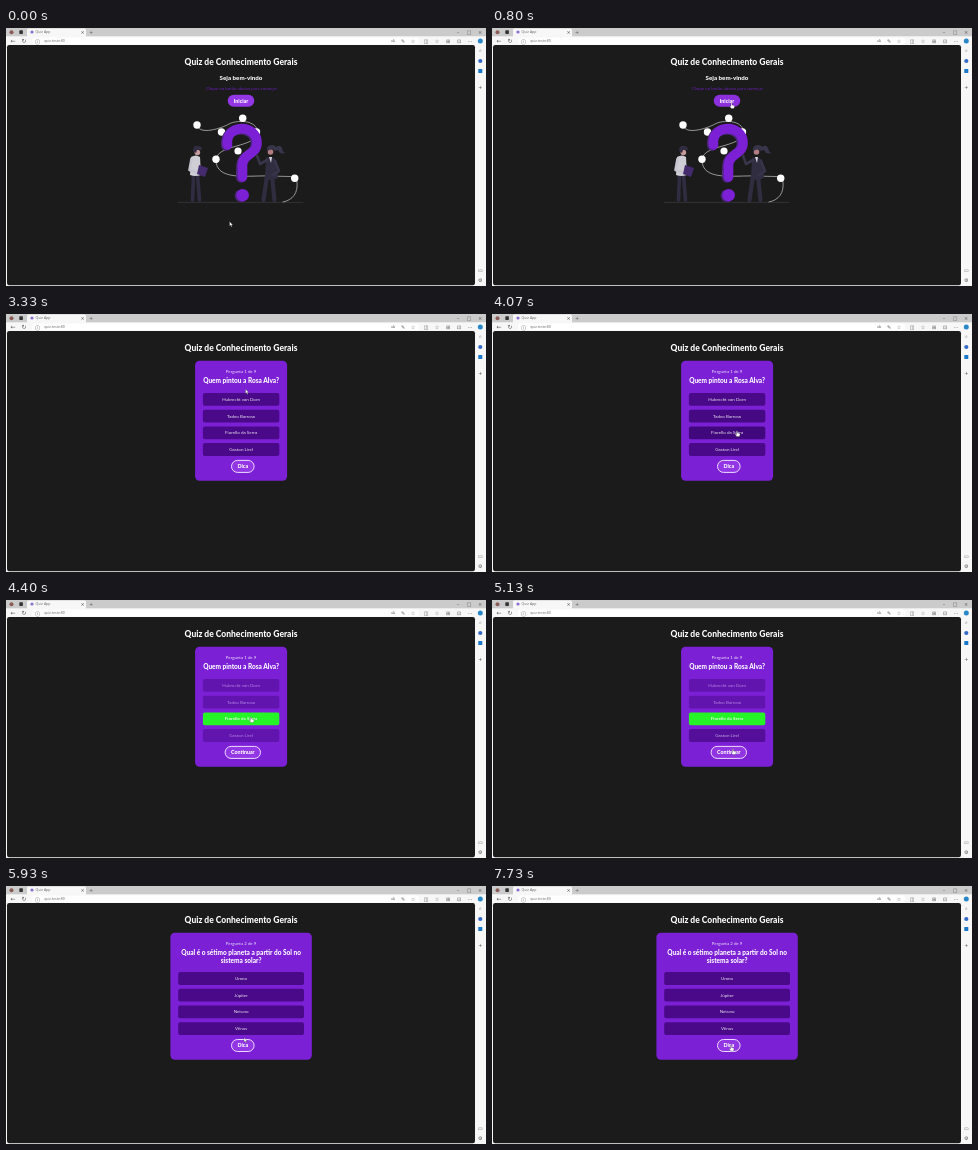
Write an HTML page that moves like this. It is 480 px wide and 258 px high and loops after 8 s.

```html
<!DOCTYPE html>
<html lang="pt">
<head>
<meta charset="utf-8">
<title>Quiz</title>
<style>
  html, body { margin: 0; width: 100%; height: 100%; overflow: hidden; background: #f7f7f7; }
  svg { display: block; width: 100vw; height: 100vh; }
  text { font-family: Lato, "Open Sans", sans-serif; fill: #fff; text-anchor: middle; }
  .bold { font-weight: 800; }
  .soft { fill-opacity: .88; }
  .violet { fill: #6820b5; }
  .chrome text { font-family: "Open Sans", sans-serif; fill: #666; }
  .chrome .icon { font-family: "DejaVu Sans", sans-serif; fill: #555; }
</style>
</head>
<body>
<svg id="stage" viewBox="0 0 480 258"></svg>
<script>
const LOOP = 8000, ASK = 1200, ANSWER = 4200, NEXT = 5870;
const FADE = 300, REVEAL = 180;
const BUTTON = '#9337e6', BUTTON_HOVER = '#8c30db';
const OPTION = '#4a0989', OPTION_HOVER = '#3b0775', CORRECT = '#25f527';
const CORRECT_INDEX = 2;

const stage = document.getElementById('stage');
const zones = [];

const rect = (x, y, w, h, r, fill, extra = '') =>
  `<rect x="${x}" y="${y}" width="${w}" height="${h}" rx="${r}" fill="${fill}" ${extra}/>`;
const dot = (x, y, r, fill) => `<circle cx="${x}" cy="${y}" r="${r}" fill="${fill}"/>`;
const path = (d, fill, extra = '') => `<path d="${d}" fill="${fill}" ${extra}/>`;
const line = (d, color, width) =>
  path(d, 'none', `stroke="${color}" stroke-width="${width}" stroke-linecap="round" stroke-linejoin="round"`);
const label = (x, y, size, text, cls = '') =>
  `<text x="${x}" y="${y}" font-size="${size}" class="${cls}">${text}</text>`;
const icons = (glyphs, x, y, dx, dy = 0, size = 5) =>
  [...glyphs].map((glyph, i) => label(x + i * dx, y + i * dy + size * .36, size, glyph, 'icon')).join('');

// A clickable part: remembered so that the pointer can be tested against it.
function zone(id, from, to, x, y, w, h, r, fill, over, content, extra = '') {
  zones.push({ id, from, to, x, y, w, h, fill, over });
  return `<g id="${id}">${rect(x, y, w, h, r, fill, extra)}${content}</g>`;
}

const pill = (id, from, to, cy, w, text, border = '#eedcff') =>
  zone(id, from, to, 236.8 - w / 2, cy - 6, w, 12, 6, BUTTON, BUTTON_HOVER,
    label(236.8, cy + 1.8, 5.3, text, 'bold'), `stroke="${border}"`);

function card(id, from, to, w, step, question, answers) {
  const cx = 235.1, x = cx - w / 2, top = 71.9 + question.length * 7.1;
  const options = answers.map((answer, i) => {
    const y = top + i * 16.7;
    return zone(id + i, from, to, x + 7.8, y, w - 15.6, 12.8, 2, OPTION, OPTION_HOVER,
      label(cx, y + 7.9, 4.5, answer, 'soft'));
  });
  return rect(x, 46.7, w, top + 41, 4.5, '#7c20d6') +
    label(cx, 58.7, 4.4, `Pergunta ${step} de 9`, 'soft') +
    question.map((row, i) => label(cx, 69.4 + i * 7.1, 6.5, row, 'bold')).join('') +
    options.join('');
}

const browser = () => '<g class="chrome">' +
  rect(0, 0, 480, 258, 0, '#f7f7f7') + rect(0, 0, 480, 8.3, 0, '#cbcbcb') +
  rect(21, .5, 59, 9, 1.5, '#f7f7f7') + rect(26, 9.5, 387, 7, 3, '#fff') +
  dot(5.5, 4.2, 2, '#8c5b58') + rect(13.3, 2.3, 3.6, 3.6, .6, '#333') + dot(26, 4, 1.6, '#8a6fd0') +
  label(37, 5.2, 3.5, 'Quiz App') + label(48.5, 14.3, 3.5, 'quiz.teste:80') + label(387, 14.2, 3.3, 'aA') +
  icons('×+', 76.5, 4, 8.5) + icons('–□×', 452, 4, 11) +
  icons('←↻', 7, 13, 11, 0, 6) + icons('ⓘ', 31.5, 13, 0) +
  icons('✎☆', 397, 13, 10) + icons('◫☆⊞⊡⋯', 420, 13, 11) +
  icons('⌕', 474.3, 22.5, 0) + icons('+', 474.3, 59, 0) + icons('▭⚙', 474.3, 242, 0, 10.5) +
  dot(474.3, 13, 2.5, '#2787c8') + dot(474.3, 33, 2.1, '#3569c8') + rect(472.3, 41, 4, 4, .5, '#1976c9') +
  rect(1, 17, 468, 240.3, 2.2, '#1b1b1b') + '</g>';

function illustration() {
  const mark = 'M221.5 117C219 95 251.5 96 251 115C251 127 236.5 125 236.5 138V149';
  const beads = [[191, 97], [236.7, 90.3], [215.5, 104], [250.5, 104], [210, 131.2], [234, 145], [288.7, 150.3]];
  return line('M172 174.4H297', '#48464c', .5) +
    line('M191 97C193 108 216 100 223 96S251 91 252 105C248 120 213 116 210 131C209 154 243 147 265 148S291 147 291 154C292 165 287 172 277 174', '#d8d8d8', .65) +
    beads.map(([x, y]) => dot(x, y, 3.7, '#fff')).join('') +
    `<g transform="translate(-1.4 .8)">${line(mark, '#4c267b', 10)}${dot(236.5, 167, 6.4, '#4c267b')}</g>` +
    line(mark, '#7c20d6', 9.6) + dot(236.7, 167.2, 6.2, '#7c20d6') + dot(232, 123, 3.6, '#fff') +
    // man with a folder
    line('M187.5 147L186.5 172M191.5 147L193.5 172', '#302d43', 3.6) +
    path('M185 129q5-3 9 0l1 18q-6 2-11 0z', '#cfcdd5') +
    line('M185.5 131L183.5 142L192 145', '#c7c5cf', 2.6) +
    path('M193 137l9 3-3 9-8-3z', '#432b6d') +
    dot(191.4, 124.5, 2.8, '#c79a9b') + path('M187 123q0-6 5-5 4 0 4 4l-5 0-1 3z', '#302d43') +
    // woman leaning on the mark
    line('M261 148L257.5 172M266 148L268.5 172', '#302d40', 4.2) +
    path('M260 130q6-3 10 2l2 18q-8 4-13 0z', '#312d41') +
    line('M261 132L254 136L251 127.5M269 133L273 143L267 147', '#38344a', 2.6) +
    path('M263 129l3 0-1 6z', '#d7d4dd') + dot(264.5, 124, 2.8, '#b17d82') +
    path('M261 123q-1-6 5-6 3 0 4 2 4-3 6 1 0 3 3 5-5 2-7-3l-3 1-3-2z', '#38344a');
}

stage.innerHTML = browser() +
  label(235, 36.9, 8.5, 'Quiz de Conhecimento Gerais', 'bold') +
  '<g id="welcome">' + label(235, 52.3, 6.2, 'Seja bem-vindo', 'bold') +
    label(235.5, 61.8, 4.4, 'Clique no botão abaixo para começar', 'violet') +
    `<g transform="translate(-1.8 0)">${pill('start', 0, ASK, 72.8, 26.6, 'Iniciar', 'none')}</g>` +
    illustration() + '</g>' +
  '<g id="first">' +
    card('a', ASK, NEXT, 92, 1, ['Quem pintou a Rosa Alva?'],
      ['Hubrecht van Dorn', 'Tadeo Barrosa', 'Fiorello da Serra', 'Gaston Lirel']) +
    pill('hintA', ASK, ANSWER, 152.4, 22.6, 'Dica') +
    pill('proceed', ANSWER, NEXT, 152.4, 35.4, 'Continuar') + '</g>' +
  '<g id="second">' +
    card('b', NEXT, LOOP, 141.4, 2, ['Qual é o sétimo planeta a partir do Sol no', 'sistema solar?'],
      ['Urano', 'Júpiter', 'Netuno', 'Vênus']) +
    pill('hintB', NEXT, LOOP, 159.5, 22.6, 'Dica') + '</g>' +
  '<g id="cursor">' +
    path('M0 0V4.6L1.1 3.7 1.9 5.4 2.6 5.1 1.8 3.4H3.2Z', '#fff', 'id="arrow" stroke="#222" stroke-width=".3"') +
    path('M-.5 0q.5-.6 1 0V2l2 .5q.7.3.5 1.1L2.5 5.6H-.3L-1.8 3.4q.3-.8 1.3 0z', '#fff', 'id="hand" stroke="#333" stroke-width=".3"') +
  '</g>';

const part = id => document.getElementById(id);
const clamp = v => Math.min(1, Math.max(0, v));
const mix = (a, b, share) => `color-mix(in srgb, ${b} ${share * 100}%, ${a})`;
const show = (id, on) => part(id).style.display = on ? '' : 'none';

// Pointer moves: start, duration and destination.
const moves = [
  [270, 1, 246, 77], [670, 130, 239.5, 75], [3330, 740, 245, 117], [4670, 460, 241, 149],
  [5600, 130, 238, 151.5], [7000, 1, 266, 159], [7470, 60, 279, 162], [7670, 60, 239, 159.5]
];
function pointer(t) {
  return moves.reduce((at, [start, length, x, y]) => {
    const k = clamp((t - start) / length), ease = k * k * (3 - 2 * k);
    return { x: at.x + (x - at.x) * ease, y: at.y + (y - at.y) * ease };
  }, { x: 223.6, y: 193.5 });
}

function inside(z, t) {
  const { x, y } = pointer(t);
  return t >= z.from && t < z.to && x > z.x && x < z.x + z.w && y > z.y && y < z.y + z.h;
}

// Share of the last FADE ms spent over a zone, which acts as a linear transition.
function hoverAmount(z, t, samples = 12) {
  let hits = 0;
  for (let i = 0; i < samples; i++) hits += inside(z, t - FADE * i / samples);
  return hits / samples;
}

function render(now) {
  const t = now % LOOP;
  const reveal = clamp((t - ANSWER) / REVEAL);
  show('welcome', t < ASK);
  show('first', t >= ASK && t < NEXT);
  show('second', t >= NEXT);
  show('hintA', t < ANSWER);
  show('proceed', t >= ANSWER);

  for (const z of zones) {
    const hover = hoverAmount(z, t), group = part(z.id);
    const color = mix(z.fill, z.over, hover);
    const correct = z.id === 'a' + CORRECT_INDEX;
    group.firstChild.style.fill = correct ? mix(color, CORRECT, reveal) : color;
    if (correct) group.lastChild.style.fontWeight = reveal ? 700 : 400;
    else if (z.id[0] === 'a') group.style.opacity = 1 - .5 * reveal * (1 - hover);
  }

  const { x, y } = pointer(t), pointing = zones.some(z => inside(z, t));
  part('cursor').setAttribute('transform', `translate(${x} ${y})`);
  show('hand', pointing);
  show('arrow', !pointing);
}

const began = performance.now();
function tick() {
  render(performance.now() - began);
  requestAnimationFrame(tick);
}
tick();
</script>
</body>
</html>
```
